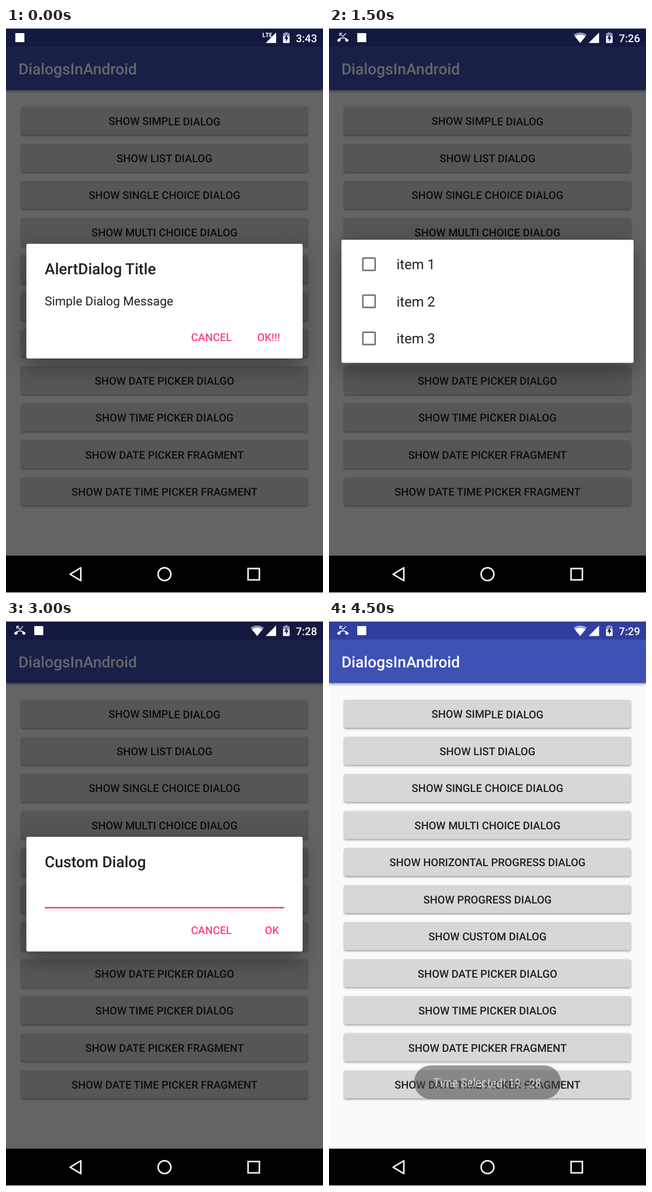
An HTML page with a canvas for the animation above (5 s loop, 561 px wide and 998 px high).

```html
<!DOCTYPE html>
<html lang="en">
<head>
<meta charset="utf-8">
<title>Dialogs demo</title>
<style>
html, body { margin: 0; width: 100%; height: 100%; overflow: hidden; background: #fff; }
canvas { display: block; width: 561px; height: 998px; }
</style>
</head>
<body>
<canvas id="stage"></canvas>
<script>
const W = 561, H = 998, DP = 1.3636, STEP = 500;
const PINK = '#ff4081', INK = '#212121', GREY = '#757575';
const canvas = document.getElementById('stage');
const ratio = window.devicePixelRatio || 1;
canvas.width = Math.round(W * ratio);
canvas.height = Math.round(H * ratio);
const c = canvas.getContext('2d');

// A minute skew keeps baselines from snapping to whole pixels.
function glyphs(str, x, y, font, color, align) {
  c.save();
  c.translate(x, y);
  c.transform(1, 1e-5, 0, 1, 0, 0);
  c.font = font;
  c.textRendering = 'geometricPrecision';
  c.textAlign = align;
  c.fillStyle = color;
  c.fillText(str, 0, 0);
  c.restore();
}

function text(str, x, y, sp, color = INK, weight = 400, align = 'left') {
  glyphs(str, x, y, `${weight} ${sp * DP}px Roboto, sans-serif`, color, align);
}

function rect(x, y, w, h, color) {
  c.fillStyle = color;
  c.fillRect(x, y, w, h);
}

function box(x, y, w, h, r, color, blur = 0, drop = 0, alpha = 0) {
  c.save();
  c.shadowColor = `rgba(0,0,0,${alpha})`;
  c.shadowBlur = blur * ratio;
  c.shadowOffsetY = drop * ratio;
  c.fillStyle = color;
  c.beginPath();
  c.roundRect(x, y, w, h, r);
  c.fill();
  c.restore();
}

function disc(x, y, r, color) {
  c.fillStyle = color;
  c.beginPath();
  c.arc(x, y, r, 0, 2 * Math.PI);
  c.fill();
}

function path(points, closed) {
  c.beginPath();
  points.forEach(p => c.lineTo(...p));
  if (closed) c.closePath();
}

function fillPoly(points, color) {
  path(points, true);
  c.fillStyle = color;
  c.fill();
}

function line(points, width, color, closed = false) {
  path(points, closed);
  c.lineWidth = width;
  c.strokeStyle = color;
  c.stroke();
}

function arc(x, y, r, from, to, width, color) {
  c.beginPath();
  c.arc(x, y, r, from * Math.PI / 180, to * Math.PI / 180);
  c.lineWidth = width;
  c.strokeStyle = color;
  c.stroke();
}

// App screen
const LABELS = ['SIMPLE DIALOG', 'LIST DIALOG', 'SINGLE CHOICE DIALOG', 'MULTI CHOICE DIALOG',
  'HORIZONTAL PROGRESS DIALOG', 'PROGRESS DIALOG', 'CUSTOM DIALOG', 'DATE PICKER DIALGO',
  'TIME PICKER DIALOG', 'DATE PICKER FRAGMENT', 'DATE TIME PICKER FRAGMENT'];

function app(dimmed) {
  rect(0, 0, W, H, '#fff');
  rect(0, 1, W, 931, '#fafafa');
  box(0, 33.5, W, 76, 0, '#3f51b5', 5, 2, 0.4);
  rect(0, 1, W, 32.7, '#303f9f');
  text('DialogsInAndroid', 22, 81.7, 20, '#fff', 500);
  LABELS.forEach((label, i) => {
    const y = 139.4 + i * 48 * DP;
    box(27, y, 507, 49.4, 2.7, '#d6d7d7', 3.5, 1.6, 0.42);
    text('SHOW ' + label, 280.5, y + 32.1, 14, INK, 500, 'center');
  });
  if (dimmed) rect(0, 1, W, 931, 'rgba(0,0,0,.6)');
}

// System bars
const ARROW = new Path2D('M6.5 5.5 12 11 19 4 18 3 12 9 7.5 4.5H11V3H5V9H6.5Z');
const HANDSET = new Path2D('M24 17.4Q19 12 12 12 5 12 0 17.4L3.5 20.9 7.4 18.3V14.3Q12 12.9 16.6 14.3V18.3L20.5 20.9Z');

function missedCall() {
  c.save();
  c.translate(14, 6);
  c.scale(0.88, 0.9);
  c.fillStyle = '#fff';
  c.fill(ARROW);
  c.fill(HANDSET);
  c.restore();
}

function wifi() {
  const fan = (r, color) => {
    c.fillStyle = color;
    c.beginPath();
    c.moveTo(444.5, 26.5);
    c.arc(444.5, 26.5, r, -2.25, -0.89);
    c.fill();
  };
  fan(18.5, 'rgba(255,255,255,.55)');
  fan(14.5, '#fff');
}

function battery() {
  rect(493.5, 7.5, 5, 3, '#8d93b8');
  box(490.3, 9, 11.6, 8, 1, '#8d93b8');
  box(490.3, 14.5, 11.6, 12, 1, '#fff');
  fillPoly([[497.2, 11], [492.4, 19], [495.4, 19], [495.4, 24.5], [500, 16.6], [497.2, 16.6]], '#1a2352');
}

function statusBar(time, lte, left) {
  if (left === 'call') missedCall();
  if (left === 'mail') rect(16.5, 9, 16, 16, '#fff');
  rect(left ? 50 : 16.5, 9, 16, 16, '#fff');
  if (lte) {
    fillPoly([[459.5, 26.5], [467.8, 18.2], [468.2, 17.8], [478, 8], [478, 26.5]], '#fff');
    glyphs('LTE', 453.5, 16, '700 10.5px "Open Sans", sans-serif', '#fff', 'left');
  } else {
    wifi();
    fillPoly([[459.5, 26.5], [478, 8], [478, 26.5]], '#fff');
  }
  battery();
  text(time, 550.5, 24.6, 14, '#fff', 500, 'right');
}

function navBar() {
  rect(0, 932, W, 65, '#000');
  c.lineJoin = 'round';
  line([[113.5, 964.8], [132.4, 953.4], [132.4, 976.2]], 2.7, '#f2f2f2', true);
  c.lineJoin = 'miter';
  arc(280.5, 964.7, 11.3, 0, 360, 2.7, '#f2f2f2');
  c.strokeRect(428.4, 954.8, 20, 20);
}

// Dialog parts
const card = (x, y, w, h) => box(x, y, w, h, 2.7, '#fff', 36, 13, 0.38);
const wideCard = (y, h) => card(22, y, 517, h);
const slimCard = (y, h) => card(36, y, 489, h);
const title = (str, x, y) => text(str, x, y, 20, INK, 500);
const action = (str, x, y) => text(str, x, y, 14, PINK, 500);

function actions(y) {
  action('CANCEL', 283.8, y);
  action('OK', 404, y);
}

function simpleDialog() {
  slimCard(381.3, 202.5);
  title('AlertDialog Title', 68.5, 435);
  text('Simple Dialog Message', 68.5, 490, 16);
  action('CANCEL', 327.4, 553.3);
  action('OK!!!', 444.5, 553.3);
}

function listDialog() {
  wideCard(343.5, 278.5);
  title('pick a color', 54.5, 397);
  ['red', 'green', 'blue'].forEach((s, i) => text(s, 54.5, 456.3 + i * 65.45, 16));
}

function singleDialog() {
  wideCard(343.5, 278.5);
  title('pick a color', 54.5, 397);
  ['red', 'green', 'blue'].forEach((s, i) => {
    const y = 448.5 + i * 65.45;
    arc(70.8, y, 12.3, 0, 360, 2.7, GREY);
    text(s, 119.5, y + 8.7, 18);
  });
}

function multiDialog() {
  wideCard(374, 217.5);
  for (let i = 0; i < 3; i++) {
    const y = 417.3 + i * 65.45;
    c.lineWidth = 2.7;
    c.strokeStyle = GREY;
    c.beginPath();
    c.roundRect(59.9, y - 10.9, 21.8, 21.8, 1.2);
    c.stroke();
    text('item ' + (i + 1), 119.5, y + 9, 18);
  }
}

function barDialog() {
  slimCard(380, 205);
  title('Dialog Title', 68.7, 433.6);
  text('Please wait while we process', 68.7, 489, 16);
  rect(68.7, 524.5, 423.5, 5.4, '#ffc6d9');
  text('0%', 68.7, 558, 14, GREY);
  text('0/100', 492.2, 558, 14, GREY, 400, 'right');
}

function spinnerDialog() {
  slimCard(395, 175.3);
  title('Dialog Title', 68.7, 448.5);
  arc(101.8, 513, 24.5, -98, 117, 5.4, PINK);
  text('Please wait while we process', 167, 520.4, 14, GREY);
}

function customDialog() {
  slimCard(381.3, 202.5);
  title('Custom Dialog', 68.5, 435);
  rect(68.7, 505, 423.5, 2.7, PINK);
  action('CANCEL', 327.4, 553.3);
  action('OK', 458, 553.3);
}

function pickerCard(y, h, head) {
  card(84.2, y, 392.6, h);
  c.fillStyle = PINK;
  c.beginPath();
  c.roundRect(84.2, y, 392.6, head, [2.7, 2.7, 0, 0]);
  c.fill();
}

function dateDialog() {
  pickerCard(151, 663, 126.5);
  text('2016', 117.3, 193.2, 16, 'rgba(255,255,255,.7)');
  text('Mon, Sep 26', 117, 242.3, 34, '#fff', 500);
  line([[139, 317], [132, 324], [139, 331]], 2.8, INK);
  line([[422, 317], [429, 324], [422, 331]], 2.8, INK);
  text('September 2016', 280.5, 330.7, 14, INK, 500, 'center');
  const colX = i => 135.6 + i * 48.3;
  [...'SMTWTFS'].forEach((s, i) => text(s, colX(i), 392, 12, GREY, 400, 'center'));
  for (let day = 1; day <= 30; day++) {
    const cell = day + 3;
    const x = colX(cell % 7), y = 438.2 + Math.floor(cell / 7) * 54.5;
    const picked = day === 26;
    if (picked) disc(x, y, 27.2, PINK);
    text(day, x, y + 5.8, 12, picked ? '#fff' : INK, 400, 'center');
  }
  actions(783.7);
}

function timeDialog() {
  const faint = 'rgba(255,255,255,.68)', cx = 280.5, cy = 520.7;
  pickerCard(215.7, 534, 131);
  text('7', 243.5, 313, 60, '#fff', 400, 'center');
  text(':', 280.5, 313, 60, faint, 400, 'center');
  text('28', 339, 313, 60, faint, 400, 'center');
  text('AM', 395.7, 276.3, 16, faint, 500);
  text('PM', 395.2, 312.8, 16, '#fff', 500);
  disc(cx, cy, 152.7, '#eee');
  const at = h => [cx + 122.7 * Math.sin(h * Math.PI / 6), cy - 122.7 * Math.cos(h * Math.PI / 6)];
  line([[cx, cy], at(7)], 2.7, PINK);
  disc(cx, cy, 4.3, PINK);
  disc(...at(7), 27.3, PINK);
  for (let h = 1; h <= 12; h++) {
    const [x, y] = at(h);
    text(h, x, y + 7.8, 16, h === 7 ? '#fff' : INK, 400, 'center');
  }
  actions(719);
}

function toast() {
  box(150.5, 785, 260, 59.5, 29.7, 'rgba(70,70,70,.55)');
  const font = `400 condensed ${16 * DP}px "Roboto Condensed", Roboto, sans-serif`;
  glyphs('Time Selected! 19 : 28', 280.5, 823.5, font, 'rgba(255,255,255,.65)', 'center');
}

const SCENES = [
  { show: simpleDialog, time: '3:43', lte: true },
  { show: listDialog, time: '3:52', lte: true, left: 'mail' },
  { show: singleDialog, time: '7:25', left: 'call' },
  { show: multiDialog, time: '7:26', left: 'call' },
  { show: barDialog, time: '7:27', left: 'call' },
  { show: spinnerDialog, time: '7:28', left: 'call' },
  { show: customDialog, time: '7:28', left: 'call' },
  { show: dateDialog, time: '7:28', left: 'call' },
  { show: timeDialog, time: '7:28', left: 'call' },
  { show: toast, time: '7:29', left: 'call' }
];

function draw() {
  const scene = SCENES[Math.floor(performance.now() / STEP) % SCENES.length];
  c.setTransform(ratio, 0, 0, ratio, 0, 0);
  app(scene.show !== toast);
  statusBar(scene.time, scene.lte, scene.left);
  scene.show();
  navBar();
  requestAnimationFrame(draw);
}
draw();
</script>
</body>
</html>
```
